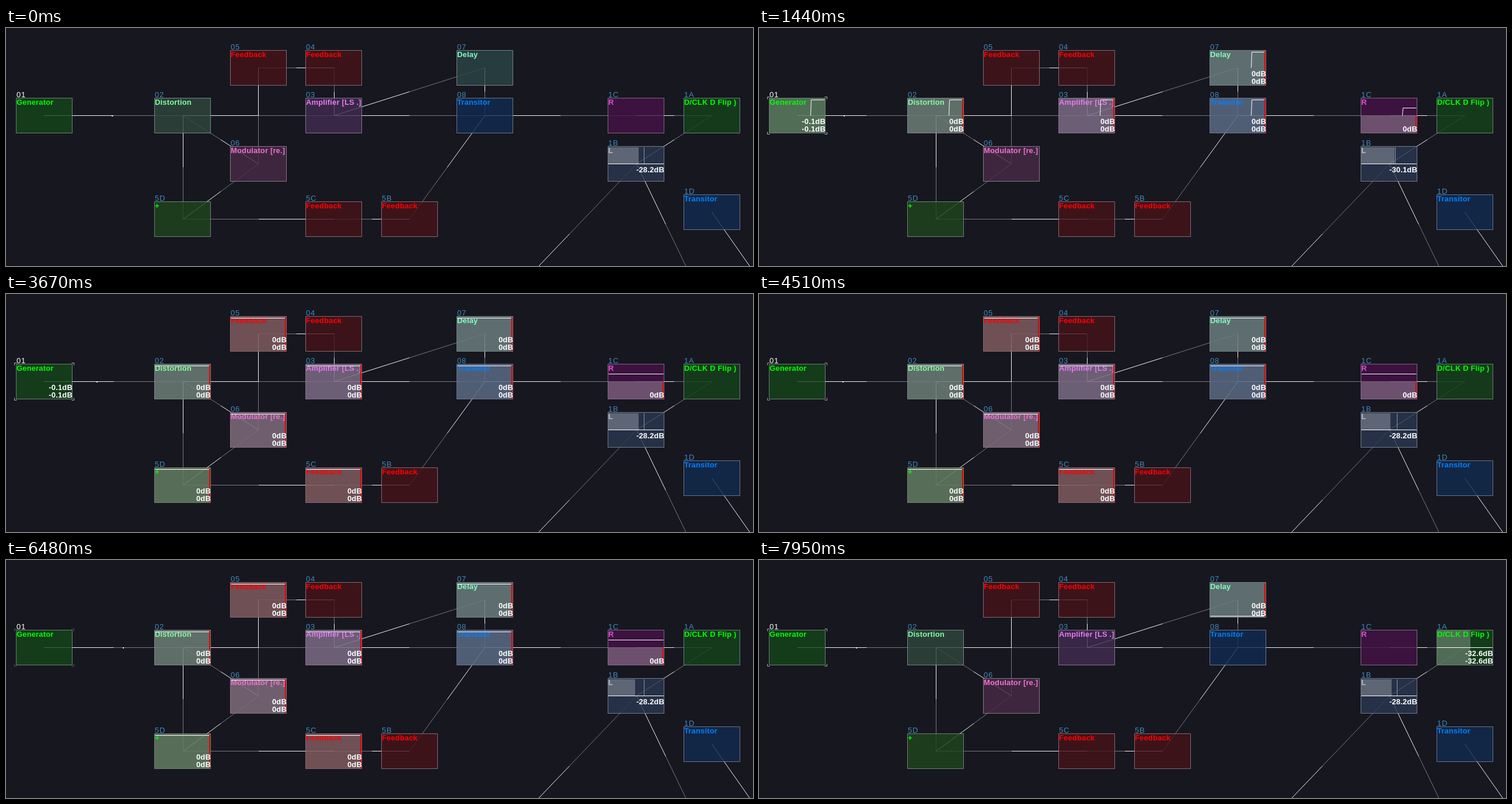
An HTML page with a canvas that plays this animation: 1280 by 409 pixels, repeating every 8 s.

```html
<!DOCTYPE html>
<html lang="en">
<head>
<meta charset="utf-8">
<title>Signal graph</title>
<style>
html, body { margin: 0; width: 100%; height: 100%; overflow: hidden; background: #171720; }
canvas { display: block; width: 1280px; height: 409px; }
</style>
</head>
<body>
<canvas id="stage" width="1280" height="409"></canvas>
<script>
const ctx = document.getElementById('stage').getContext('2d');
const LOOP = 8000, TICK = 68.5, W = 97, H = 61;
const BG = [23, 23, 32];
const VEIL = 'rgba(222,222,222,.3)';
// Column lefts; boxes snap down, wire ends snap to the nearest pixel
const COLS = [17, 254.5, 384, 513.5, 643, 772, 1031.5, 1161];

// id, column, top, title, title colour, box colour
const nodes = [
  ['01', 0, 120, 'Generator', '#00ff00', [20, 60, 28]],
  ['02', 1, 120, 'Distortion', '#80ffa0', [42, 62, 56]],
  ['03', 3, 120, 'Amplifier [LS .]', '#e878f0', [57, 39, 72]],
  ['04', 3, 38, 'Feedback', '#ff0000', [61, 19, 27]],
  ['05', 2, 38, 'Feedback', '#ff0000', [61, 19, 27]],
  ['06', 2, 203, 'Modulator [re.]', '#f070d0', [62, 39, 62]],
  ['07', 5, 38, 'Delay', '#80ffc0', [39, 60, 64]],
  ['08', 5, 120, 'Transitor', '#0080ff', [18, 39, 72]],
  ['1A', 7, 120, 'D/CLK D Flip )', '#00ff00', [20, 58, 28]],
  ['1B', 6, 203, 'L', '#b8bcc4', [38, 49, 72]],
  ['1C', 6, 120, 'R', '#e050d0', [59, 19, 63]],
  ['1D', 7, 286, 'Transitor', '#0080ff', [18, 39, 70]],
  ['5B', 4, 298, 'Feedback', '#ff0000', [61, 19, 27]],
  ['5C', 3, 298, 'Feedback', '#ff0000', [61, 19, 27]],
  ['5D', 1, 298, '+', '#00ff00', [29, 60, 30]]
].map(([id, col, y, title, ink, fill]) => ({
  id, x: Math.floor(COLS[col]), y, title, ink, fill,
  center: [Math.round(COLS[col] + 48), y + 30]
}));
const byId = Object.fromEntries(nodes.map(n => [n.id, n]));

const wires = ('01-02 02-03 03-04 04-05 05-06 06-02 02-5D 5D-06 03-07 07-08 03-08 ' +
  '08-1C 1C-1A 1B-1A 08-5B 5B-5C 5C-5D').split(' ').map(w => w.split('-').map(id => byId[id].center));
wires.push([[850, 474], [1080, 233]], [[1080, 233], [1180, 441]], [[1209, 316], [1349, 516]]);

// Ticks at which a module goes high, goes low and falls silent
const near = { on: 20, low: 97, off: 114 };
const far = { on: 22, low: 99, off: 113 };
const signals = {
  '01': { on: 20, low: 200, off: 25, hold: 60, label: '-0.1dB' },
  '02': near, '03': near, '08': near,
  '07': { on: 20, low: 97, off: 200 },
  '1C': { ...near, half: true },
  '05': far, '06': far, '5C': far, '5D': far
};

const levelKeys = [[0, 52], [420, 46], [800, 56], [1140, 48], [1440, 57], [1800, 47], [2130, 52],
  [2500, 60], [3000, 47], [3670, 52], [4100, 59], [4700, 46], [5360, 48], [5750, 58], [6480, 46],
  [6900, 57], [7400, 47], [7950, 52]];
const pulseKeys = [[0, .49], [1440, 2.34], [2130, 3.51], [3670, 5.38], [5360, 7.29], [6480, 8.57], [7950, 10.43]];
const readKeys = [[0, '-28.2'], [560, '-30.1'], [2350, '-28.2'], [5560, '-30.1'], [5840, '-28.2']];

function lerpKeys(keys, t) {
  const i = Math.max(1, keys.findIndex(k => k[0] >= t));
  const [[t0, a], [t1, b]] = [keys[i - 1], keys[i]];
  return a + (b - a) * (t - t0) / (t1 - t0);
}

function rect(x, y, w, h, color) {
  ctx.fillStyle = color;
  ctx.fillRect(x, y, w, h);
}

function path(points, color) {
  ctx.beginPath();
  points.forEach(([x, y]) => ctx.lineTo(x + .5, y + .5));
  ctx.strokeStyle = color;
  ctx.lineWidth = 1;
  ctx.stroke();
}

function text(str, x, y, color, weight = 'bold', align = 'left') {
  ctx.font = weight + ' 13px "Liberation Sans", Arial, sans-serif';
  ctx.letterSpacing = weight === 'bold' ? '0.15px' : '0.7px';
  ctx.textAlign = align;
  ctx.fillStyle = color;
  ctx.fillText(str, x, y);
}

function reading(n, str, dy) { text(str, n.x + W, n.y + dy, '#fff', 'bold', 'right'); }

function drawWire([a, b]) {
  const mid = [(a[0] + b[0]) / 2, (a[1] + b[1]) / 2];
  path([mid, b], '#77777c');
  path([a, mid], '#f0f0f0');
}

function drawBody(n) {
  // Translucent body lets the wires show through faintly
  const body = n.fill.map((v, i) => Math.max(0, Math.round((v - .2 * BG[i]) / .8)));
  rect(n.x, n.y, W, H, `rgba(${body},.8)`);
}

function drawVeil(n, tick, t) {
  const s = signals[n.id];
  if (s && tick >= s.on && tick < s.off) {
    const top = s.half ? 30 : 1;
    rect(n.x + 1, n.y + top, W - 2, H - top - 1, VEIL);
  }
  if (n.id === '1B') rect(n.x + 1, n.y + 2, Math.round(lerpKeys(levelKeys, t)), 28, VEIL);
  if (n.id === '1A' && tick >= 97) rect(n.x + 1, n.y + 1, 57, H - 2, VEIL);
}

function drawTitle(n) {
  text(n.id, n.x + 1, n.y - 1, n.id === '01' ? '#fff' : '#3f8cbc', 'normal');
  text(n.title, n.x + 1, n.y + 12, n.ink);
}

function drawWave(n, s, tick) {
  const left = n.x + 1, right = n.x + W - 2, mid = n.y + 30;
  const high = n.y + (s.half ? 17 : 3), low = n.y + (s.half ? 44 : 58);
  const edge = start => Math.max(left, right - (tick - start) * 24);
  const rise = edge(s.on), fall = edge(s.low);
  let points = [[rise, high], [right, high]];
  if (rise > left) points = [[rise, mid], [rise + 1, high], [right, high]];
  if (tick >= s.low) points = [[left, high], [fall, high], [fall, low], [right, low]];
  if (tick >= s.low && fall === left) points = [[left, low], [right, low]];
  path(points, '#fff');
}

function drawSignal(n, s, tick) {
  if (tick < s.on) return;
  const lit = tick < s.off;
  if (lit) {
    const top = s.half ? 31 : 2;
    drawWave(n, s, tick);
    if (!s.label) rect(n.x + 94, n.y + top, 2, H - top - 1, '#e60000');
  }
  if (lit || tick < s.hold) {
    const label = s.label || '0dB';
    if (!s.half) reading(n, label, 45);
    reading(n, label, 58);
  }
}

function drawMeter(n, t) {
  const value = readKeys.findLast(k => k[0] <= t)[1];
  rect(n.x + (value === '-28.2' ? 62 : 59), n.y + 2, 1, 28, '#8d929c');
  rect(n.x + 1, n.y + 30, W - 2, 1, '#fff');
  reading(n, value + 'dB', 45);
}

function drawFlip(n, tick) {
  if (tick < 97) return;
  rect(n.x + 1, n.y + 30, W - 2, 1, '#fff');
  reading(n, '-32.6dB', 45);
  reading(n, '-32.6dB', 58);
}

function drawBrackets(t) {
  const glow = .5 + .5 * Math.cos((t - 1480) / 1060 * 2 * Math.PI);
  ctx.globalAlpha = Math.max(0, (glow - .07) * .75);
  for (const [x, dx] of [[14, 4], [116, -4]])
    for (const [y, dy] of [[118, 4], [182, -4]])
      path([[x + dx, y], [x, y], [x, y + dy]], '#fff');
  ctx.globalAlpha = 1;
}

function draw(time) {
  const t = Math.min(time, 7950);
  const tick = Math.floor(t / TICK + .05);
  rect(0, 0, 1280, 409, `rgb(${BG})`);
  wires.forEach(drawWire);
  const dot = 65 + 238 * (lerpKeys(pulseKeys, t) % 1);
  rect(Math.round(dot) - 1, 150, 2, 2, '#fff');
  for (const n of nodes) {
    drawBody(n);
    drawVeil(n, tick, t);
    drawTitle(n);
    path([[n.x, n.y], [n.x + W - 1, n.y], [n.x + W - 1, n.y + H - 1], [n.x, n.y + H - 1], [n.x, n.y]],
      'rgba(255,255,255,.36)');
    if (signals[n.id]) drawSignal(n, signals[n.id], tick);
    if (n.id === '1B') drawMeter(n, t);
    if (n.id === '1A') drawFlip(n, tick);
  }
  drawBrackets(t);
}

const start = performance.now();
function frame() {
  draw((performance.now() - start) % LOOP);
  requestAnimationFrame(frame);
}
frame();
</script>
</body>
</html>
```
